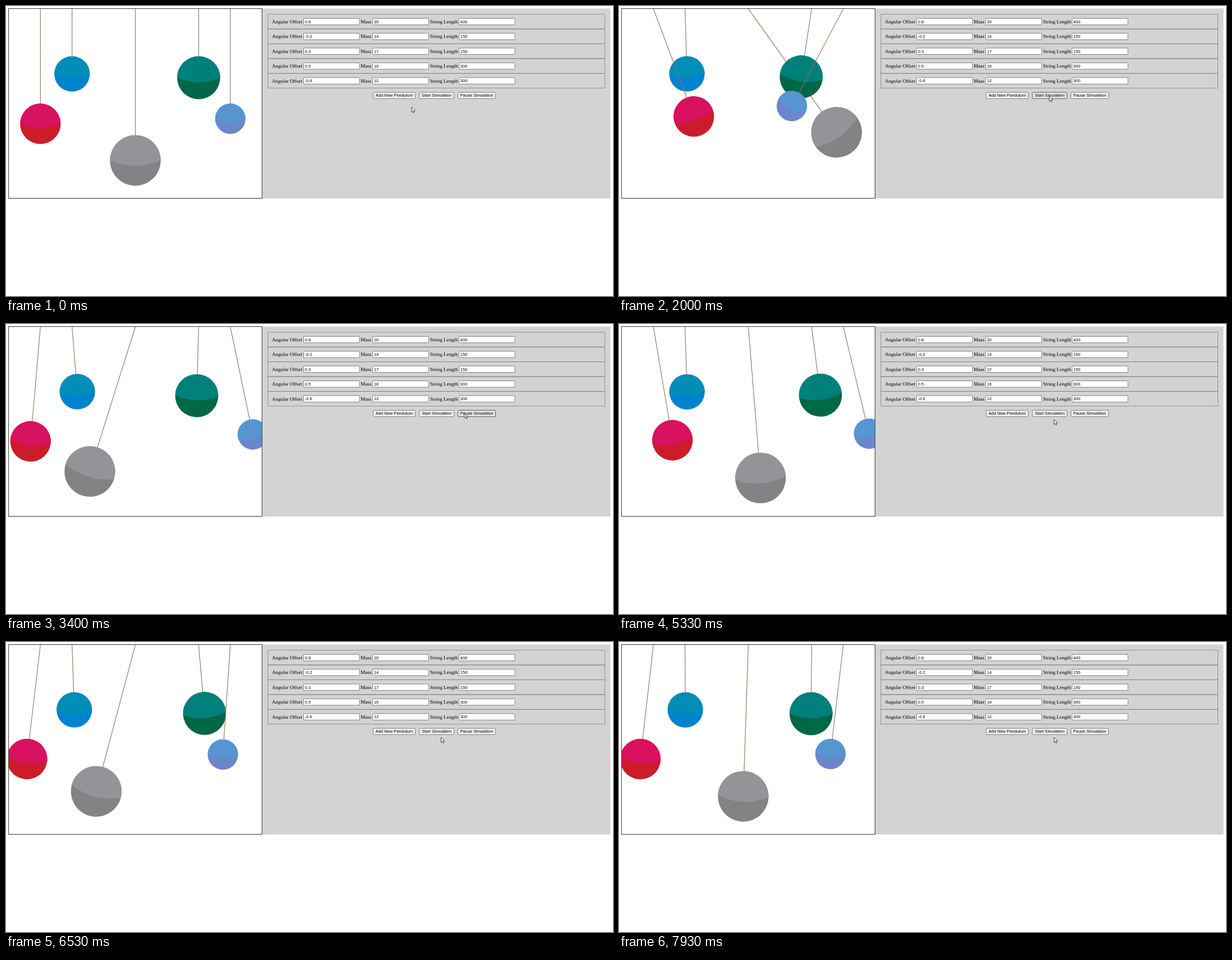
Recreate the animation shown at these times as an HTML page. Size 1082x518 px, loop 8000 ms.

```html
<!DOCTYPE html>
<html lang="en">
<head>
<meta charset="utf-8">
<title>Pendulum simulation</title>
<style>
  html, body { margin: 0; width: 100%; height: 100%; overflow: hidden; background: #fff; }
  svg { display: block; width: 1082px; height: 518px; }
  .label { font: 9.03px "Liberation Serif", Times, serif; }
  .field { font: 7.52px "Liberation Sans", Arial, sans-serif; }
  .mid { text-anchor: middle; }
</style>
</head>
<body>
<svg id="stage" viewBox="0 0 1082 518">
  <defs><clipPath id="view"><rect x="5" y="5" width="451" height="338"/></clipPath></defs>
</svg>
<script>
const LOOP = 8000, FPS = 15;
const SCALE = 0.5642, LEFT = 4.9, TOP = 5.1;
const PULL = 1045, DRAG = 0.834, DT = 0.002;

const pendulums = [
  { offset: 0.8, mass: 20, length: 400, x: 400, top: '#939498', low: '#828385' },
  { offset: -0.2, mass: 14, length: 150, x: 200, top: '#008db7', low: '#0083cf' },
  { offset: 0.3, mass: 17, length: 150, x: 600, top: '#00807b', low: '#006747' },
  { offset: 0.5, mass: 16, length: 300, x: 100, top: '#d81160', low: '#cc1b29' },
  { offset: -0.6, mass: 12, length: 300, x: 700, top: '#5596d2', low: '#6a87cc' }
];

const buttons = [
  { text: 'Add New Pendulum', x: 654.5, w: 75 },
  { text: 'Start Simulation', x: 736.9, w: 61.6 },
  { text: 'Pause Simulation', x: 805.7, w: 66.8 }
];

// Pointer stops: seconds, x, y
const pointer = [
  [0, 723, 180.8], [0.267, 767, 161.3], [2.333, 767, 161.3], [2.667, 817, 159],
  [4.333, 817, 159], [4.533, 768, 161.3], [5.067, 768, 161.3], [5.267, 775.5, 170.5]
];
const presses = [[1.3, 1.5], [3.18, 3.38], [4.84, 4.97]];

const stage = document.getElementById('stage');

function add(parent, tag, attrs, text) {
  const el = document.createElementNS('http://www.w3.org/2000/svg', tag);
  for (const key in attrs) el.setAttribute(key, attrs[key]);
  if (text !== undefined) el.textContent = text;
  parent.appendChild(el);
  return el;
}

function box(x, y, w, h, fill, stroke, width = 1, rx = 0) {
  return add(stage, 'rect', { x, y, width: w, height: h, rx, fill, stroke, 'stroke-width': width });
}

function label(text, x, y, cls) {
  add(stage, 'text', { x, y, class: cls }, text);
}

function buildPanel() {
  box(456.5, 4.5, 621, 339.3, '#d3d3d3', 'none');
  pendulums.forEach((p, i) => {
    const y = 14.7 + 26.45 * i;
    box(466.8, y, 600.6, 26.2, 'none', '#808080', 0.8);
    const fields = [
      ['Angular Offset', 473.9, 530.5, p.offset],
      ['Mass', 632.3, 653.7, p.mass],
      ['String Length', 755.8, 807.6, p.length]
    ];
    for (const [name, x, fx, value] of fields) {
      label(name, x, y + 16, 'label');
      box(fx, y + 7.5, 99.6, 11.4, '#fff', '#767676', 0.9, 0.8);
      label(value, fx + 2.2, y + 15.9, 'field');
    }
  });
  for (const b of buttons) {
    b.el = box(b.x, 154.2, b.w, 11.2, '#efefef', '#767676', 0.9, 1.5);
    label(b.text, b.x + b.w / 2, 162.4, 'field mid');
  }
}

function buildPendulums() {
  box(4.6, 4.6, 451.8, 338.9, '#fff', '#333', 1);
  const view = add(stage, 'g', { 'clip-path': 'url(#view)' });
  for (const p of pendulums) {
    const r = p.mass * 4 * SCALE, len = p.length * SCALE, y = len + r;
    p.el = add(view, 'g', {});
    add(p.el, 'path', { d: `M0 0V${len + 1}`, stroke: '#8b7650', 'stroke-width': 1.1 });
    add(p.el, 'circle', { cy: y, r, fill: p.low });
    add(p.el, 'path', {
      d: `M${-r} ${y}A${r} ${r} 0 0 1 ${r} ${y}Q0 ${y + 0.43 * r} ${-r} ${y}Z`,
      fill: p.top
    });
  }
}

// Simulated time: the second run goes at about half speed.
function simTime(t) {
  if (t < 1.52) return -1;
  if (t < 4.996) return Math.min(t - 1.5, 1.865);
  const stall = Math.min(Math.max(t - 7.334, 0), 0.0667);
  return 1.865 + 0.514 * (t - 4.996 - stall);
}

function angleAt(p, u) {
  if (u < 0) return 0;
  const pull = PULL * p.mass / p.length;
  let a = p.offset, v = 0;
  for (let n = Math.round(u / DT); n > 0; n--) {
    v -= (pull * Math.sin(a) + DRAG * v) * DT;
    a += v * DT;
  }
  return a;
}

function pointerAt(t) {
  let i = 0;
  while (i < pointer.length - 1 && pointer[i + 1][0] <= t) i++;
  const [t0, x0, y0] = pointer[i];
  const [t1, x1, y1] = pointer[i + 1] || [t0 + 1, x0, y0];
  const k = (t - t0) / (t1 - t0);
  return [x0 + (x1 - x0) * k, y0 + (y1 - y0) * k];
}

function draw(ms) {
  const t = Math.floor((ms + 4) * FPS / 1000) / FPS;
  const u = simTime(t);
  for (const p of pendulums) {
    const deg = angleAt(p, u) * 180 / Math.PI;
    p.el.setAttribute('transform', `translate(${LEFT + p.x * SCALE} ${TOP}) rotate(${deg})`);
  }
  const [x, y] = pointerAt(t);
  const down = presses.some(([a, b]) => t >= a && t < b);
  for (const b of buttons) {
    const over = x > b.x && x < b.x + b.w && y > 154 && y < 165.6;
    b.el.setAttribute('fill', over ? (down ? '#f5f5f5' : '#e5e5e5') : '#efefef');
    b.el.setAttribute('stroke', over ? (down ? '#8d8d8d' : '#4f4f4f') : '#767676');
  }
  cursor.setAttribute('transform', `translate(${x} ${y})`);
}

buildPanel();
buildPendulums();
const cursor = add(stage, 'path', {
  d: 'M0 0V8.8L2 7L3.3 10L4.8 9.4L3.5 6.4H6.2Z',
  fill: '#fff', stroke: '#111', 'stroke-width': 0.75
});

const start = performance.now();
function tick() {
  draw((performance.now() - start) % LOOP);
  requestAnimationFrame(tick);
}
draw(0);
requestAnimationFrame(tick);
</script>
</body>
</html>
```
